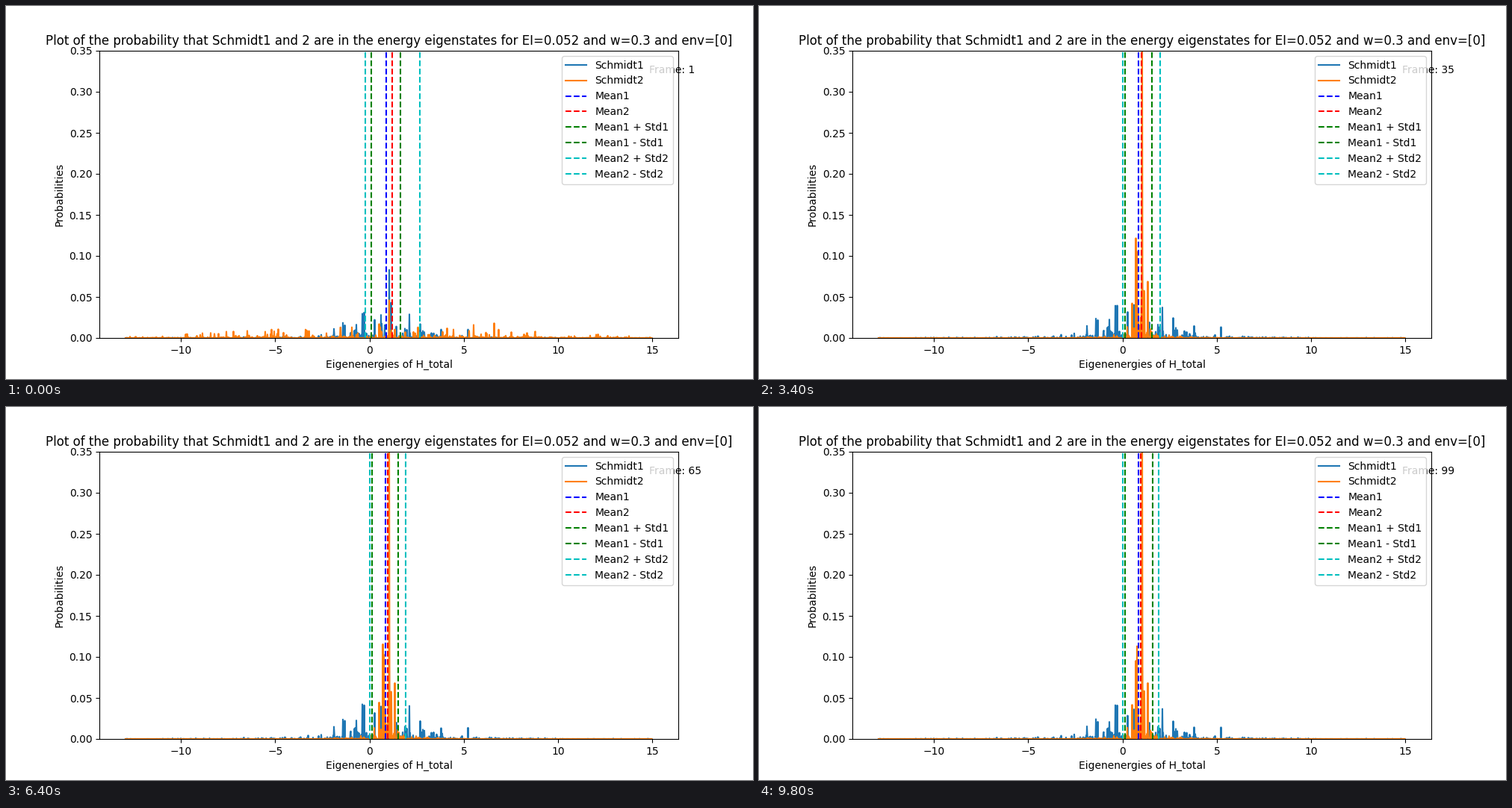
A matplotlib script that plays this animation: 1000 by 500 pixels, repeating every 9900 ms.

```python
import numpy as np
import matplotlib.pyplot as plt
from matplotlib.animation import FuncAnimation

FRAMES, INTERVAL = 99, 100
X_ZERO, X_UNIT = 486.7, 25.25          # stage position of energy 0, pixels per unit
rng = np.random.default_rng(11)

stage_x = np.arange(160, 865, 0.5)
energy = (stage_x - X_ZERO) / X_UNIT

# Tallest peaks: stage x -> probability
PEAKS1 = {439: .015, 451: .025, 453.5: .021, 469: .022, 477: .040, 479.5: .042,
          493.5: .030, 502: .038, 513: .083, 515.5: .058, 540: .039, 554.5: .023,
          582.5: .014, 618.5: .014}
PEAKS2 = {493: .013, 499.5: .042, 506: .109, 515.5: .060, 520.5: .065}
START2 = {499.5: .017, 513: .046, 626: .016, 653.5: .018}

# Slow drift of the means and deviations
TIMES = [0, 12, 24, 42, 64, 80, 98]
MEAN1 = [.87, .855, .84, .84, .833, .87, .855]
STD1 = [.77, .735, .715, .715, .698, .77, .735]
MEAN2 = [.95, .95, 1.0, 1.0, .96, .96, .96]
STD2 = [.89, .89, .99, .99, .95, .91, .95]


def spikes(height, center, width, density, power=1.0):
    """Seeded spikes at random levels under a bell-like envelope."""
    envelope = height * np.exp(-np.abs((energy - center) / width) ** power)
    chosen = rng.random(energy.size) < density
    return envelope * chosen * np.minimum(rng.exponential(0.5, energy.size), 1.2)


def with_peaks(levels, peaks):
    levels = levels.copy()
    for x, height in peaks.items():
        levels[np.abs(stage_x - x).argmin()] = height
    return levels


base1 = with_peaks(spikes(.021, .8, 2.2, .2) + spikes(.004, .5, 6, .12), PEAKS1)
base2 = with_peaks(spikes(.045, .97, .3, .5, 4) + spikes(.014, 1, 1, .2)
                   + spikes(.0008, 1, 6, .2), PEAKS2)
start1 = with_peaks(base1 * .74, {513: .083})
start2 = with_peaks(spikes(.011, .8, 10.5, .12, 2.5) + spikes(.002, 1, 10, .3, 2),
                    START2)
phase = rng.uniform(0, 2 * np.pi, energy.size)
rate = rng.uniform(.2, .7, energy.size)


def spectra(i, start):
    wobble = 1 + .06 * np.sin(rate * i + phase)
    main = .355 + .03 * np.cos(2 * np.pi * (i - 24) / 37)
    side = .110 + .015 * np.sin(2 * np.pi * (i - 20) / 100)
    late1 = with_peaks(base1 * wobble, {513: .083})
    late2 = with_peaks(base2 * wobble, {504.5: side, 513: main})
    return (start1 * start + late1 * (1 - start),
            start2 * start + late2 * (1 - start))


def marker_positions(i, start):
    m1, s1, m2, s2 = (np.interp(i, TIMES, row) for row in (MEAN1, STD1, MEAN2, STD2))
    m2, s2 = m2 + .26 * start, s2 + .55 * start
    return m1, m2, m1 + s1, m1 - s1, m2 + s2, m2 - s2


fig, ax = plt.subplots(figsize=(10, 5), dpi=100)
line1, = ax.plot(energy, start1, label="Schmidt1")
line2, = ax.plot(energy, start2, label="Schmidt2")
markers = [ax.axvline(0, color=color, linestyle="--", label=label)
           for color, label in [("b", "Mean1"), ("r", "Mean2"),
                                ("g", "Mean1 + Std1"), ("g", "Mean1 - Std1"),
                                ("c", "Mean2 + Std2"), ("c", "Mean2 - Std2")]]
counter = ax.text(0.95, 0.95, "", transform=ax.transAxes, va="top")
ax.set_xlim((125 - X_ZERO) / X_UNIT, (900 - X_ZERO) / X_UNIT)
ax.set_ylim(0, 0.35)
ax.set_xlabel("Eigenenergies of H_total")
ax.set_ylabel("Probabilities")
ax.set_title("Plot of the probability that Schmidt1 and 2 are in the energy "
             "eigenstates for EI=0.052 and w=0.3 and env=[0]")
ax.legend(loc="upper right")


def update(i):
    start = np.exp(-i / 2)              # share of the initial state still left
    for line, levels in zip((line1, line2), spectra(i, start)):
        line.set_ydata(levels)
    for marker, x in zip(markers, marker_positions(i, start)):
        marker.set_xdata([x, x])
    counter.set_text(f"Frame: {i + 1}")
    return [line1, line2, *markers, counter]


anim = FuncAnimation(fig, update, frames=FRAMES, interval=INTERVAL, repeat=True)
plt.show()
```
